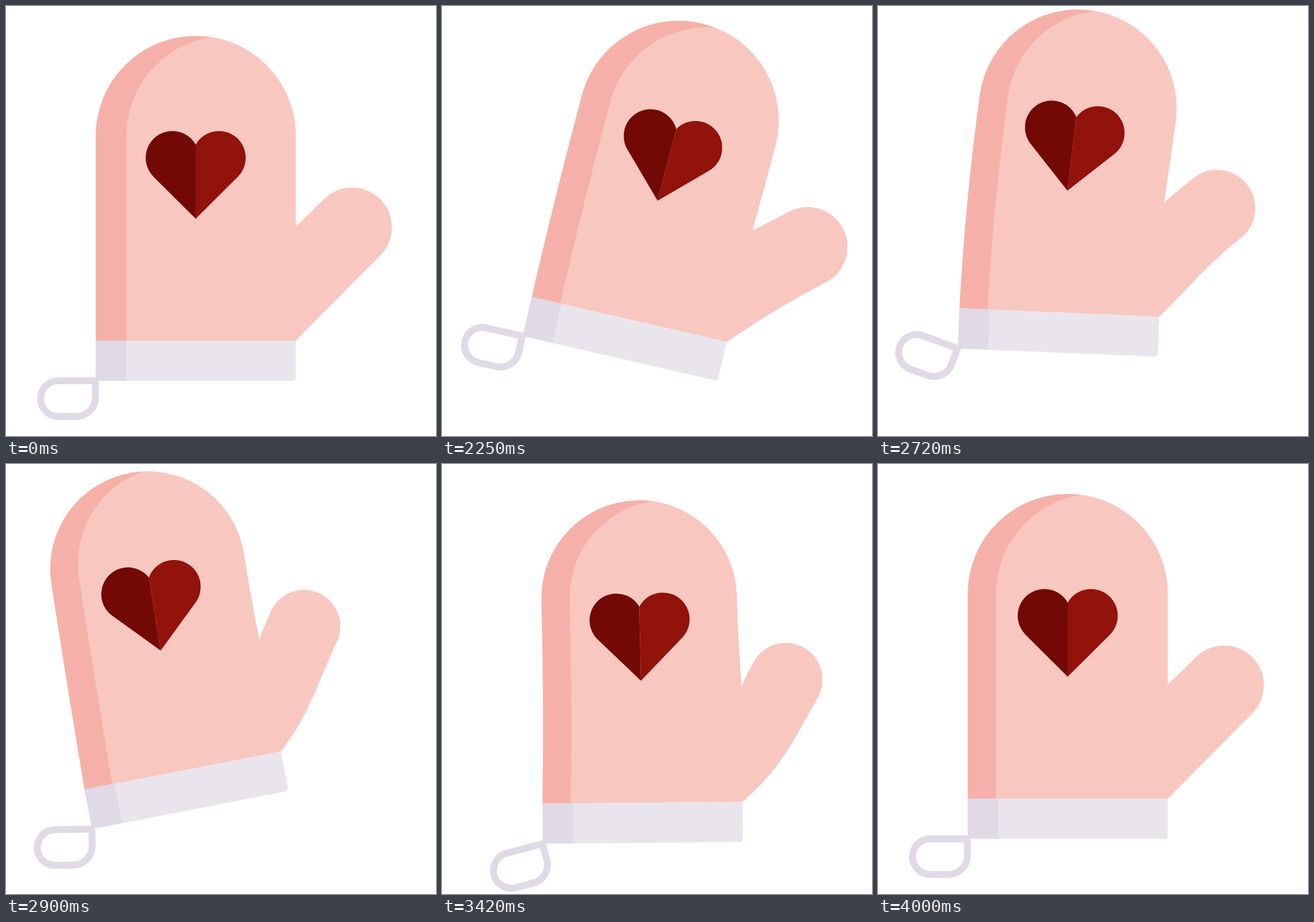
Write an HTML page with a canvas that moves like this. It is 748 by 748 pixels and loops after 4020 ms.

```html
<!DOCTYPE html>
<html>
<head>
<meta charset="utf-8">
<title>Oven mitt</title>
<style>
  html, body { margin: 0; width: 100%; height: 100%; overflow: hidden; background: #fff; }
  canvas { display: block; }
</style>
</head>
<body>
<canvas id="stage" width="748" height="748"></canvas>
<script>
const ctx = document.getElementById('stage').getContext('2d');
const LOOP = 4020, START = 2000, RAD = Math.PI / 180;

// time, cuff angle, cuff x, cuff y, body bend, thumb bend, thumb shift, squeeze, hanger angle
const KEYS = [
  [START, 0, 0, 0, 0, 0, 0, 0, 0],
  [2300, 15.5, -14, -43, 8, 6, 3, 0, 16],
  [2430, 20, -16, -48, 16, 14, 5, 0, 25],
  [2520, 19, -16, -48, 22, 20, 7, 0, 31],
  [2700, 4, -16, -49, 18, 6, -4, 2, 22],
  [2900, -10.9, -16, -49.5, 7, -9, -17, 5, -1],
  [2990, -18, -16, -49, -3, -18, -23, 5, -4],
  [3070, -16, -11, -45, -8, -26, -29, 5, -5],
  [3250, -12, 9, -27, -14, -35, -35, 4.5, -17],
  [3420, -0.5, 19, 7, -3, -15, -21, 4.5, -15],
  [3640, 2.8, 8, 2, 3, 3, 0, 0, 6],
  [3780, 1, 2, 1, 1, 2, 0, 0, 20],
  [4000, 0, 0, 0, 0, 0, 0, 0, 0]
];

const slope = (i, c) => KEYS[i] && KEYS[i + 1]
  ? (KEYS[i + 1][c] - KEYS[i][c]) / (KEYS[i + 1][0] - KEYS[i][0]) : 0;

// Harmonic mean: smooth, with no overshoot past a key
function tangent(i, c) {
  const a = slope(i - 1, c), b = slope(i, c);
  return a * b > 0 ? 2 * a * b / (a + b) : 0;
}

function poseAt(t) {
  t = Math.min(Math.max(t, START), 4000);
  let i = 0;
  while (i < KEYS.length - 2 && t >= KEYS[i + 1][0]) i++;
  const from = KEYS[i], to = KEYS[i + 1], span = to[0] - from[0];
  const u = (t - from[0]) / span, v = 1 - u;
  return from.slice(1).map((p, k) => {
    const c = k + 1;
    return p * (1 + 2 * u) * v * v + to[c] * u * u * (3 - 2 * u)
      + span * u * v * (tangent(i, c) * v - tangent(i + 1, c) * u);
  });
}

function fill(color, path) {
  ctx.fillStyle = color;
  ctx.fill(path);
}

// Left side and rounded top; returns the right end of the arc
function addHead(path, bend, r, shift) {
  const turn = 2 * bend / 356, cos = Math.cos(turn), sin = Math.sin(turn);
  const x = 174 + bend + shift, y = -356;
  const lx = x - r * cos, ly = y - r * sin;
  path.moveTo(shift, 0);
  path.quadraticCurveTo(lx - 180 * sin, ly + 180 * cos, lx, ly);
  path.arc(x, y, r, turn + Math.PI, turn + 2 * Math.PI);
  return { x: x + r * cos, y: y + r * sin, cos, sin };
}

function addThumb(path, bend, shift, r) {
  const crotchY = -198 - 0.008 * bend * bend;
  const d = (bend - 45) * RAD, cos = Math.cos(d), sin = Math.sin(d);
  const x = 446 + shift, y = -197 + bend;
  const topX = x + r * sin, topY = y - r * cos;
  const lowX = x - r * sin, lowY = y + r * cos;
  const half = Math.hypot(topX - 348, topY - crotchY) / 2;
  const reach = 0.4 * Math.hypot(lowX - 348, lowY);
  const root = (-45 - 0.3 * bend) * RAD;
  path.quadraticCurveTo(topX - half * cos, topY - half * sin, topX, topY);
  path.arc(x, y, r, d - Math.PI / 2, d + Math.PI / 2);
  path.bezierCurveTo(lowX - reach * cos, lowY - reach * sin,
    348 + reach * Math.cos(root), reach * Math.sin(root), 348, 0);
}

function drawMitt(bend, thumbBend, thumbShift, squeeze, shade) {
  const r = 174 - 0.9 * squeeze;
  const body = new Path2D();
  const end = addHead(body, bend, r, 0);
  const crotchY = -198 - 0.008 * thumbBend * thumbBend;
  const half = (crotchY - end.y) / 2;
  body.quadraticCurveTo(end.x - half * end.sin, end.y + half * end.cos, 348, crotchY);
  addThumb(body, thumbBend, thumbShift, 69 - 1.2 * squeeze);
  body.closePath();
  fill('#f5b1a9', body);

  const light = new Path2D();
  const edge = addHead(light, bend, r, shade);
  light.lineTo(700, edge.y);
  light.lineTo(700, 0);
  ctx.save();
  ctx.clip(body);
  fill('#f8c7c0', light);
  ctx.restore();
}

function drawHeart(bend) {
  const half = new Path2D();
  half.moveTo(0, 64);
  half.arc(-40.5, -42, 46.5, 0.75 * Math.PI, 2 * Math.PI - 0.514);
  half.closePath();
  ctx.save();
  ctx.translate(174 + 0.6 * bend, -276);
  ctx.rotate(0.0046 * bend);
  fill('#730905', half);
  ctx.scale(-1, 1);
  fill('#91130c', half);
  ctx.restore();
}

function drawCuff() {
  ctx.fillStyle = '#e1d9e6';
  ctx.fillRect(0, 0, 90, 70);
  const light = new Path2D();
  light.roundRect(53, 0, 295, 70, [0, 0, 6, 6]);
  fill('#eae5ec', light);
}

const hanger = new Path2D('M0 0H-64.5A31 31 0 0 0 -64.5 62H-33A33 33 0 0 0 0 29Z');

function draw(t) {
  const [angle, x, y, bend, thumbBend, thumbShift, squeeze, swing] = poseAt(t);
  const shade = 53.5 - 4.3 * Math.min(1, Math.max(0, (t - START) / 400));
  ctx.clearRect(0, 0, 748, 748);
  ctx.save();
  // Turn about the cuff's middle, then work from its top left corner
  ctx.translate(330 + x, 617 + y);
  ctx.rotate(angle * RAD);
  ctx.translate(-174, -35);
  drawMitt(bend, thumbBend, thumbShift, squeeze, shade);
  drawHeart(bend);
  drawCuff();
  ctx.translate(-0.5, 70);
  ctx.rotate((swing - angle) * RAD);
  ctx.strokeStyle = '#e1d9e6';
  ctx.lineWidth = 12;
  ctx.stroke(hanger);
  ctx.restore();
}

const begin = performance.now();
function tick() {
  draw((performance.now() - begin) % LOOP);
  requestAnimationFrame(tick);
}
tick();
</script>
</body>
</html>
```
